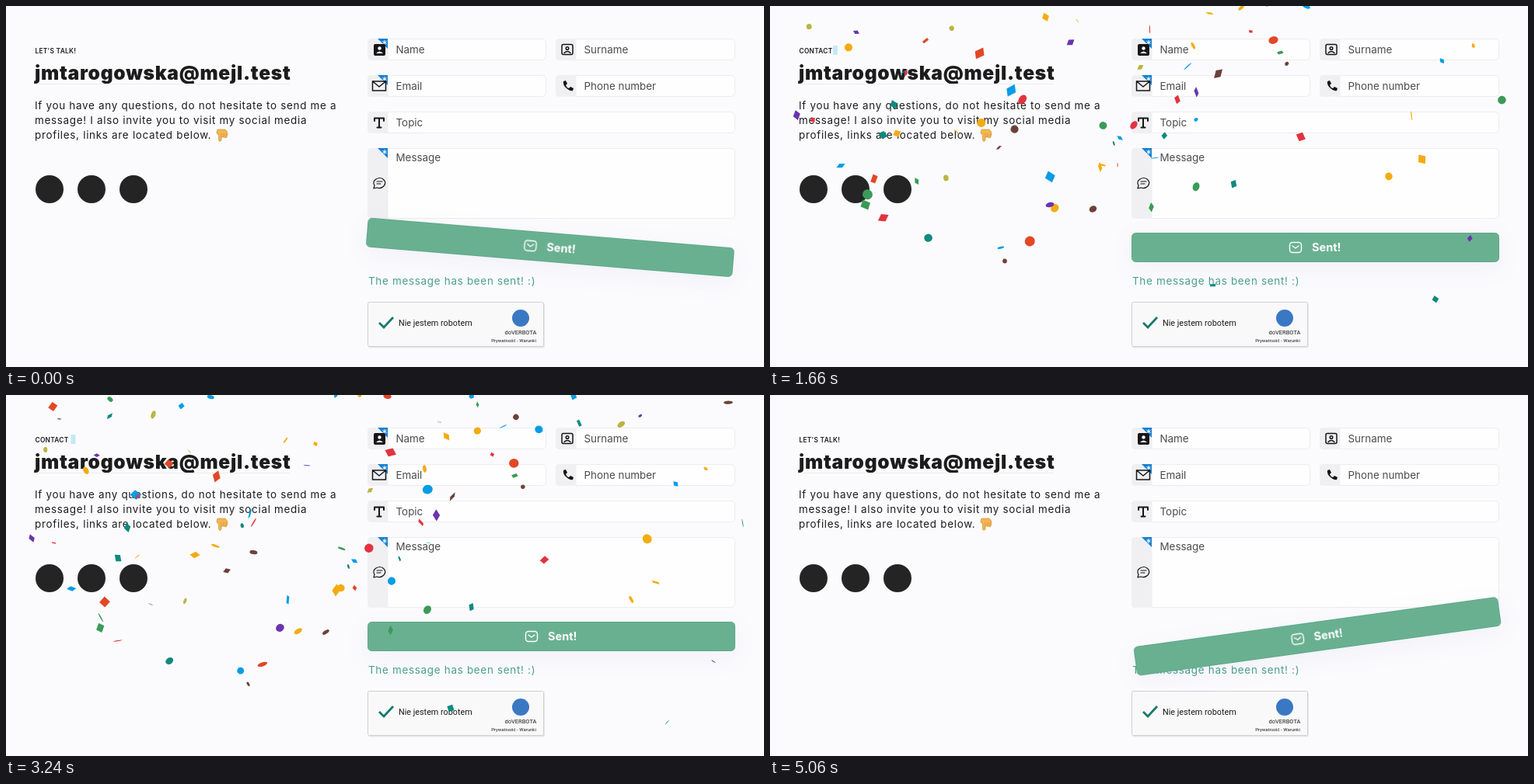
These frames come from a looping animation (975 by 465 pixels, 5100 ms). An HTML page with a canvas:

```html
<!DOCTYPE html>
<html lang="en">
<head>
<meta charset="utf-8">
<title>Contact form</title>
<style>
  html, body { margin: 0; width: 100%; height: 100%; overflow: hidden; background: #fbfbfd; }
  svg, canvas { position: absolute; left: 0; top: 0; width: 975px; height: 465px; }
  text { font-family: Inter, sans-serif; font-size: 13.4px; fill: #1c1c1c; white-space: pre; }
  .wide { letter-spacing: .72px; }
  .field text { fill: #4c4c4c; }
  .box { fill: #fefefe; stroke: #ededf0; }
  .captcha text { font-family: Roboto, sans-serif; }
  .line { fill: none; stroke: #151515; stroke-width: 1.5; stroke-linejoin: round; stroke-linecap: round; }
  #button { filter: drop-shadow(0 8px 14px rgba(90, 90, 190, .06)); }
</style>
</head>
<body>
<svg viewBox="0 0 975 465">
  <text id="title" x="37.5" y="61" style="font-size:8.4px;font-weight:600;letter-spacing:.25px"></text>
  <rect id="cursor" y="51" width="6" height="12" fill="#c6e8f7"/>
  <text class="wide" x="37" y="94.5" style="font-size:24.6px;font-weight:900">jmtarogowska@mejl.test</text>
  <path d="M37 100.5H365" stroke="#ececf0"/>
  <g class="wide">
    <text x="37" y="133">If you have any questions, do not hesitate to send me a</text>
    <text x="37" y="152">message! I also invite you to visit my social media</text>
    <text x="37" y="171">profiles, links are located below.</text>
  </g>
  <g fill="#f3b552" stroke="#c98a35" stroke-width=".6">
    <path d="M272 159h10q3 2 3 6l-1 4q-2 2-3 0h-4v4q-2 3-3.500 0v-7q-3-1-2.500-4z"/>
    <path d="M277 164v5M280 164v5M283 164v4" fill="none"/>
  </g>
  <g fill="#242424">
    <circle cx="56" cy="236" r="18"/><circle cx="110" cy="236" r="18"/><circle cx="164" cy="236" r="18"/>
  </g>

  <g id="fields"></g>
  <rect x="473" y="49" width="15" height="15" rx="2" fill="#151515"/>
  <g fill="#fff"><circle cx="480.500" cy="54.500" r="2.200"/><path d="M476 61q4.500-5 9 0z"/></g>
  <rect class="line" x="715" y="49.500" width="14" height="13" rx="2"/>
  <circle class="line" cx="722" cy="54.500" r="1.800"/>
  <path class="line" d="M718 60.500q4-4 8 0"/>
  <path class="line" d="M471.500 97h17v12h-17zl8.500 7 8.500-7"/>
  <path d="M717 97l3-1 2 4-2 2q1 3 4 4l2-2 4 2-1 3q-3 1-8-3t-4-9z" fill="#151515"/>
  <path d="M474 148v-3.500h12v3.500M480 144.500v12M477.500 156.500h5" class="line" style="stroke-width:2"/>
  <path class="line" d="M473 235l1-4q-3-5 2-8 5-3 9 0 5 4 1 9-4 4-9 2zM477 226h7M477 229h5" style="stroke-width:1.200"/>

  <text class="wide" x="466" y="359" style="fill:#4a9f8d">The message has been sent! :)</text>

  <g class="captcha">
    <rect x="466" y="382.500" width="227" height="58" rx="2" fill="#e6e6e9"/>
    <rect x="465.500" y="381.500" width="226" height="57" rx="2" fill="#f9f9fa" stroke="#d0d0d2"/>
    <path d="M480 408l6 6 12-13" fill="none" stroke="#17796a" stroke-width="2.800"/>
    <text x="505" y="412" style="font-size:10.800px">Nie jestem robotem</text>
    <circle cx="662" cy="402" r="11" fill="#3a78c4"/>
    <text x="662" y="423" text-anchor="middle" style="font-size:7.500px">doVERBOTA</text>
    <text x="653" y="433" text-anchor="middle" style="font-size:6px">Prywatność - Warunki</text>
  </g>

  <g id="button">
    <rect x="465.500" y="292.500" width="472" height="37" rx="5" fill="#69b091" stroke="#5da887"/>
    <g fill="none" stroke="#fff" stroke-width="1.400" stroke-linecap="round" stroke-linejoin="round">
      <rect x="668.500" y="304.500" width="15" height="13" rx="3.500"/><path d="M672 309l4 3 4-3"/>
    </g>
    <text x="697" y="316" style="font-size:14.500px;font-weight:700;fill:#fff">Sent!</text>
  </g>
</svg>
<canvas id="sky" width="975" height="465"></canvas>

<script>
const LOOP = 5100, W = 975, H = 465;
const $ = id => document.getElementById(id);
const ctx = $('sky').getContext('2d');

function field(label, x, y, w, h, required) {
  const r = x + 26.5;
  const mark = required ? `<path d="M${x + 13} ${y}h13v13z" fill="#1680d2"/>
    <path d="M${x + 22} ${y + 2}v6m-2.600-4.500l5.200 3m0-3l-5.200 3" stroke="#fff"/>` : '';
  return `<g class="field"><rect class="box" x="${x + .5}" y="${y + .5}" width="${w - 1}" height="${h - 1}" rx="5"/>
    <path d="M${r} ${y}h-21.500q-5 0-5 5v${h - 10}q0 5 5 5h21.500z" fill="#f0f0f3"/>${mark}
    <text x="${x + 36.5}" y="${y + (h > 50 ? 17 : 19)}">${label}</text></g>`;
}
$('fields').innerHTML =
  field('Name', 465, 42, 230, 28, true) + field('Surname', 707, 42, 231, 28) +
  field('Email', 465, 89, 230, 28, true) + field('Phone number', 707, 89, 231, 28) +
  field('Topic', 465, 136, 473, 28) + field('Message', 465, 183, 473, 91, true);

let seed = 11;
function rnd(a = 0, b = 1) {
  seed = (seed * 16807) % 2147483647;
  return a + (b - a) * seed / 2147483647;
}

const colours = ['#069ce6', '#f4ab12', '#e2333f', '#069ce6', '#6d4139', '#0f8a7e',
  '#f4ab12', '#3b9a58', '#6a34ad', '#e24726', '#b9b542'];

// A sparse front of pieces leads, the dense shower follows
const pieces = Array.from({ length: 125 }, (_, i) => ({
  colour: colours[i % colours.length], round: rnd() < .5, size: rnd(.4, 1.05),
  x: rnd(0, W), delay: 510 * rnd() ** .62,
  phase: rnd(0, 6.28), flip: rnd(.003, .009), turn: rnd(0, 6.28), spin: rnd(-.003, .003),
  drift: rnd(-.025, .025), sway: rnd(0, 6.28), skew: rnd(-.4, .4)
}));

// Steady fall with a quicker start that fades through drag
const fall = t => 69 + .2 * t - 54 * Math.exp((900 - t) / 600);

function drawConfetti(t) {
  ctx.clearRect(0, 0, W, H);
  for (const p of pieces) {
    const y = fall(t) - p.delay;
    if (y < -12 || y > H + 12) continue;
    ctx.save();
    ctx.translate(p.x + p.drift * t + 6 * Math.cos(t * .005 + p.sway), y);
    ctx.rotate(p.turn + p.spin * t);
    const flat = Math.max(.1, Math.abs(Math.cos(p.phase + p.flip * t)));
    ctx.transform(p.size, 0, p.round ? 0 : p.skew, p.size * flat, 0, 0);
    ctx.fillStyle = p.colour;
    ctx.beginPath();
    if (p.round) ctx.arc(0, 0, 6.5, 0, 7);
    else ctx.rect(-5, -5.5, 10, 11);
    ctx.fill();
    ctx.restore();
  }
}

function drawTitle(t) {
  const leaving = t < 1010;
  const n = leaving ? 11 - Math.floor((t - 790) / 20) : 1 + Math.floor((t - 1010) / 107);
  const title = $('title'), blink = t % 240;
  title.textContent = (leaving ? "LET'S TALK!" : 'CONTACT ME.').slice(0, Math.max(0, Math.min(11, n)));
  const on = blink > 115 && blink < 225;
  $('cursor').setAttribute('visibility', on ? 'visible' : 'hidden');
  $('cursor').setAttribute('x', 38 + title.getComputedTextLength());
}

const swing = [0, 15, -10, 5, -5, 0];
function drawButton(t) {
  const u = Math.min(4.999, (.286 + t / 500) * 5), i = Math.floor(u), k = u - i;
  const angle = swing[i] + (swing[i + 1] - swing[i]) * k * k * (3 - 2 * k);
  $('button').setAttribute('transform', `rotate(${angle} 701.5 292)`);
}

const start = performance.now();
function frame() {
  const now = (performance.now() - start) % LOOP;
  const t = Math.min(now, LOOP - now); // plays forward, then back
  drawTitle(t);
  drawButton(t);
  drawConfetti(t);
  requestAnimationFrame(frame);
}
frame();
</script>
</body>
</html>
```
